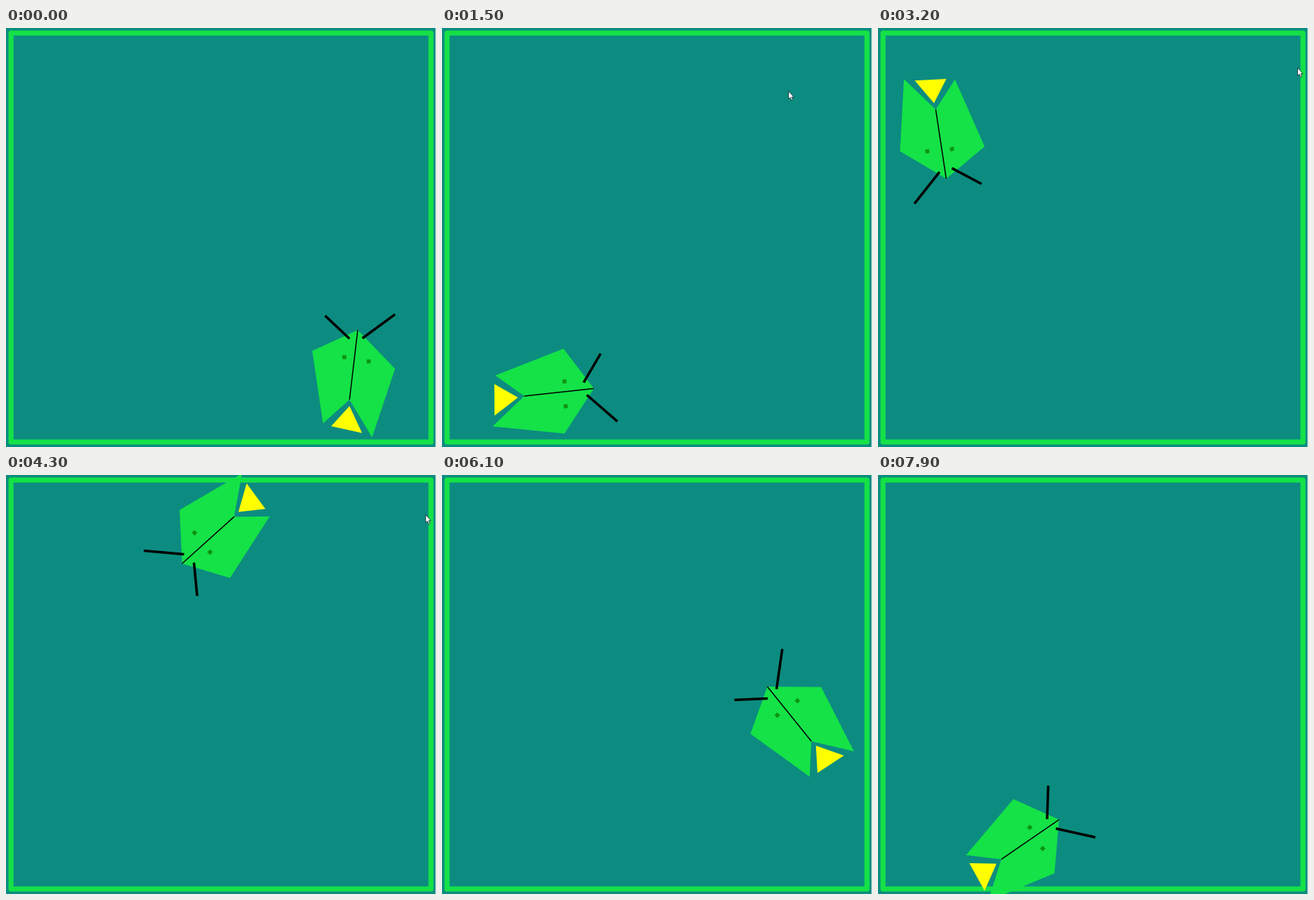
An HTML page with a canvas for the animation above (8000 ms loop, 600 px wide and 584 px high).

```html
<!DOCTYPE html>
<html lang="en">
<head>
<meta charset="utf-8">
<title>Bug on patrol</title>
<style>
html, body { margin: 0; width: 100%; height: 100%; overflow: hidden; background: #0c8c80; }
canvas { display: block; }
</style>
</head>
<body>
<canvas id="stage" width="600" height="584"></canvas>
<script>
const ctx = document.getElementById('stage').getContext('2d');
const LOOP = 8, STEP = 0.1; // seconds
const TEAL = '#0c8c80', GREEN = '#14e247';

// The bug's centre walks clockwise around this rectangle, each side taking
// the same time, while the bug spins steadily about that centre.
const LEFT = 74, RIGHT = 497.8, TOP = 78, BOTTOM = 521.5;
const PIVOT = [497.5, 475.4];
const SIDES_PER_SECOND = 0.6, SPIN_SECONDS = 7;
const START = (PIVOT[1] - TOP) / (BOTTOM - TOP); // part of the right side already walked

const mix = (a, b, f) => a + (b - a) * f;

function pointAt(sides) {
  const f = sides % 1;
  return [
    [RIGHT, mix(TOP, BOTTOM, f)],
    [mix(RIGHT, LEFT, f), BOTTOM],
    [LEFT, mix(BOTTOM, TOP, f)],
    [mix(LEFT, RIGHT, f), TOP]
  ][Math.floor(sides) % 4];
}

function trace(points) {
  ctx.beginPath();
  for (let i = 0; i < points.length; i += 2) ctx.lineTo(points[i], points[i + 1]);
}

function shape(color, ...points) {
  trace(points);
  ctx.fillStyle = color;
  ctx.fill();
}

function line(width, ...points) {
  trace(points);
  ctx.strokeStyle = '#000';
  ctx.lineWidth = width;
  ctx.stroke();
}

function drawStage() {
  ctx.fillStyle = TEAL;
  ctx.fillRect(0, 0, 600, 584);
  ctx.fillStyle = '#a8d0cc';
  ctx.fillRect(599, 0, 1, 584);
  ctx.strokeStyle = GREEN;
  ctx.lineWidth = 7;
  ctx.lineJoin = 'round';
  ctx.strokeRect(7, 7, 586, 570);
}

function drawBug(t) {
  const clock = t + 0.05 * (t / LOOP) ** 5; // gains a little near the end
  ctx.save();
  ctx.translate(...pointAt(START + clock * SIDES_PER_SECOND));
  ctx.rotate(clock / SPIN_SECONDS * 2 * Math.PI);
  ctx.translate(-PIVOT[0], -PIVOT[1]);
  shape(GREEN, 490.5, 421, 542.5, 475, 510.5, 570.5, 479, 518, 442, 551, 427, 450);
  shape('#ff0', 479, 527, 496.5, 564.5, 453.5, 555);
  line(1.5, 490.5, 421, 479, 518);
  line(3.5, 479, 433, 445, 401);
  line(3.5, 497, 432.5, 542.5, 399.2);
  ctx.fillStyle = '#0f930f';
  ctx.fillRect(469, 456, 5.5, 5.5);
  ctx.fillRect(503, 462, 5.5, 5.5);
  ctx.restore();
}

function drawCursor(x, y) {
  ctx.save();
  ctx.translate(x, y);
  shape('#fff', 0, 0, 0, 11, 2.4, 8.8, 4.2, 13, 6, 12.2, 4.3, 8.2, 7.5, 8.2);
  ctx.closePath();
  ctx.strokeStyle = '#123';
  ctx.lineWidth = 0.8;
  ctx.stroke();
  ctx.restore();
}

function draw() {
  const t = Math.floor(performance.now() / 1000 % LOOP / STEP) * STEP;
  const during = (from, to) => t >= from && t < to;
  drawStage();
  drawBug(t);
  if (during(1.3, 1.9)) drawCursor(483.5, 88);
  if (during(2.2, 4.4)) drawCursor(585.5, 55.5);
  if (during(4.9, 5.3)) drawCursor(31, 44);
  requestAnimationFrame(draw);
}
draw();
</script>
</body>
</html>
```
